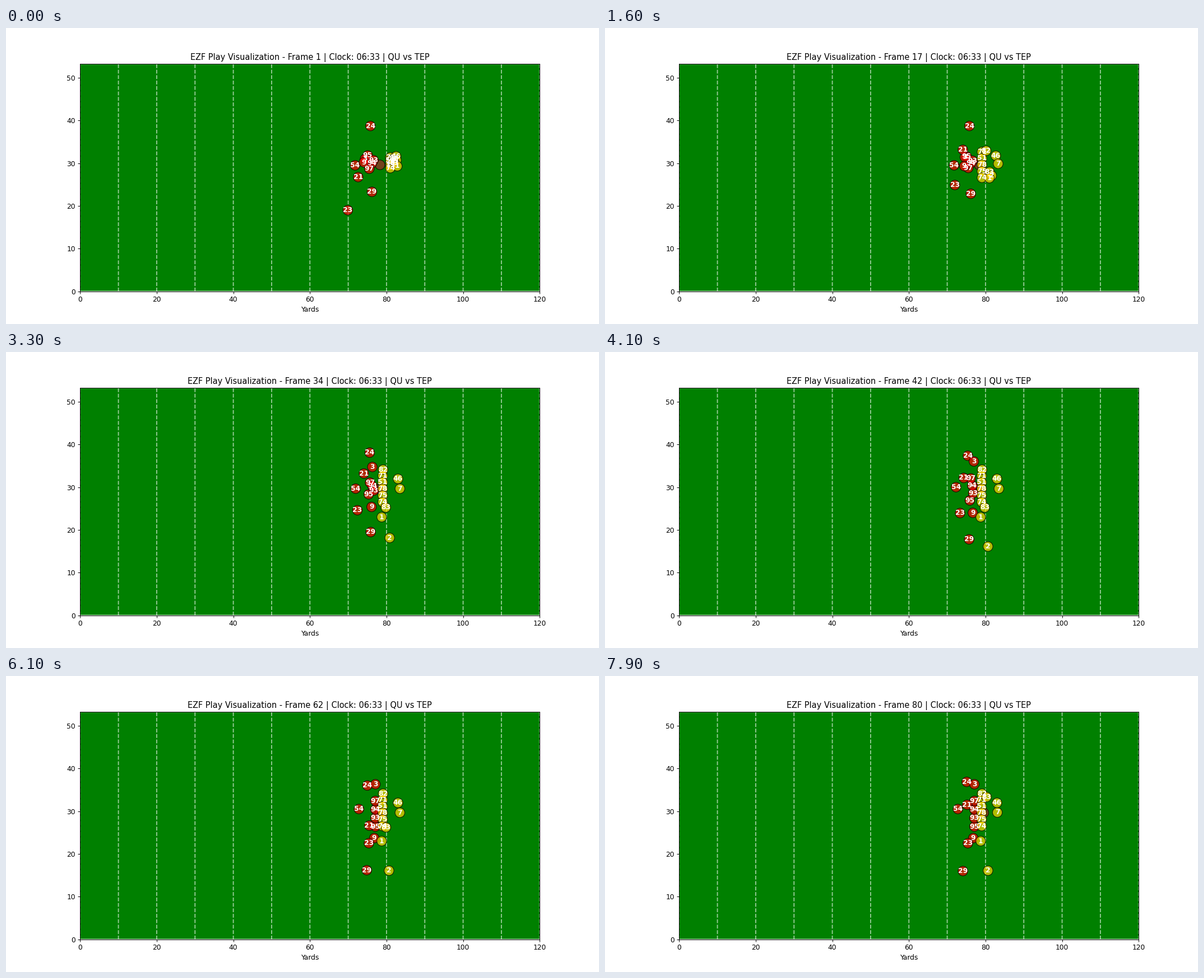
These frames come from a looping animation (1058x529 px, 8 s). A matplotlib script:

```python
import numpy as np
import matplotlib.pyplot as plt
from matplotlib.animation import FuncAnimation

FRAMES, INTERVAL = 80, 100
DPI = 1058 / 12
WIDTH = 53.2
RED, GOLD, BROWN = "red", "gold", "brown"
SNAP = np.array([78.3, 29.6])

fig, ax = plt.subplots(figsize=(12, 6), dpi=DPI)
fig.subplots_adjust(top=0.8785)
ax.set_facecolor("green")
ax.set_xlim(0, 120)
ax.set_ylim(0, WIDTH)
ax.set_xlabel("Yards")
for x in range(0, 121, 10):
    ax.axvline(x, color="white", linestyle="--", alpha=0.6, snap=False)
for y in (0, WIDTH):
    ax.axhline(y, color="white", linewidth=2, alpha=0.8)
title = ax.set_title("", fontsize=11.9)


def ease(i, t0, t1):
    s = min(max((i - t0) / (t1 - t0), 0), 1)
    return s * s * (3 - 2 * s)


class Player:
    """A numbered dot that walks along eased legs (t0, t1, x, y)."""

    def __init__(self, color, number, start, *legs):
        self.color, self.start, self.legs = color, np.array(start, float), legs
        self.label = ax.text(0, 0, str(number), color="white", fontsize=10,
                             fontweight="bold", ha="center", va="center")

    def at(self, i):
        p = self.start
        for t0, t1, *goal in self.legs:
            p = p + (np.array(goal) - p) * ease(i, t0, t1)
        return p


class Rusher(Player):
    """Slides sideways along the front first, then steps up to it."""

    def at(self, i):
        goal = np.array(self.legs[0])
        pace = np.array([ease(i, 25, 62), ease(i, 11, 48)])
        return self.start + (goal - self.start) * pace


ball = Player(BROWN, "", SNAP, (76, 85, 83.1, 29.7))

# defensive front, two yards apart
front = [(95, 75.1, 31.8), (93, 76.6, 30.7), (94, 76.2, 30.0), (97, 75.5, 28.7)]
defense = [Rusher(RED, n, (x, y), (77.1, 26.4 + 2 * k))
           for k, (n, x, y) in enumerate(front)]
defense += [
    Player(RED, 24, (75.8, 38.7), (20, 62, 75, 36), (63, 79, 75.1, 36.85)),
    Player(RED, 3, (74.4, 31), (10, 46, 77.1, 36.3)),
    Player(RED, 9, (74.1, 30.2), (7, 46, 76.8, 23.7)),
    Player(RED, 54, (71.8, 29.5), (25, 57, 72.8, 30.5)),
    Player(RED, 21, (72.6, 26.75), (0, 17, 74.1, 33.2),
           (34, 62, 75.5, 26.6), (63, 79, 75.2, 31.5)),
    Player(RED, 29, (76.2, 23.3), (9, 54, 75.6, 16.4), (47, 75, 74.1, 16)),
    Player(RED, 23, (69.9, 19), (0, 16, 72, 24.9), (25, 62, 75.4, 22.5)),
]

# offensive line: an even row beside the ball, bunched up in the huddle
offense = [Player(GOLD, n, (81, 30.1 + 0.62 * k),
                  (0, 18, 79, SNAP[1] + 1.54 * k))
           for k, n in zip(range(2, -3, -1), (71, 51, 78, 75, 74))]
offense += [
    Player(GOLD, 82, (81.9, 31), (5, 24, 79.1, 34.1)),
    Player(GOLD, 46, (82.5, 31.6), (9, 26, 83, 31.95)),
    Player(GOLD, 7, (82.6, 30.7), (9, 19, 83.5, 29.65), (68, 79, 83.1, 29.7)),
    Player(GOLD, 83, (82, 30), (6, 28, 79.8, 25.25), (55, 84, 80.3, 34)),
    Player(GOLD, 2, (81.9, 30.5), (4, 42, 80.65, 16.1)),
    Player(GOLD, 1, (82.8, 29.3), (4, 30, 78.75, 23)),
]

players = [ball, *defense, *offense]
start = np.array([p.at(0) for p in players])
dots = ax.scatter(*start.T, s=200, c=[p.color for p in players],
                  edgecolors="black", linewidths=1, alpha=0.7, zorder=2.2)


def draw(i):
    spots = [p.at(i) for p in players]
    dots.set_offsets(spots)
    for player, spot in zip(players, spots):
        player.label.set_position(spot)
    title.set_text(f"EZF Play Visualization - Frame {i + 1} | "
                   "Clock: 06:33 | QU vs TEP")
    return [dots, title]


anim = FuncAnimation(fig, draw, frames=FRAMES, interval=INTERVAL,
                     init_func=lambda: draw(0), repeat=True, repeat_delay=0)
plt.show()
```
